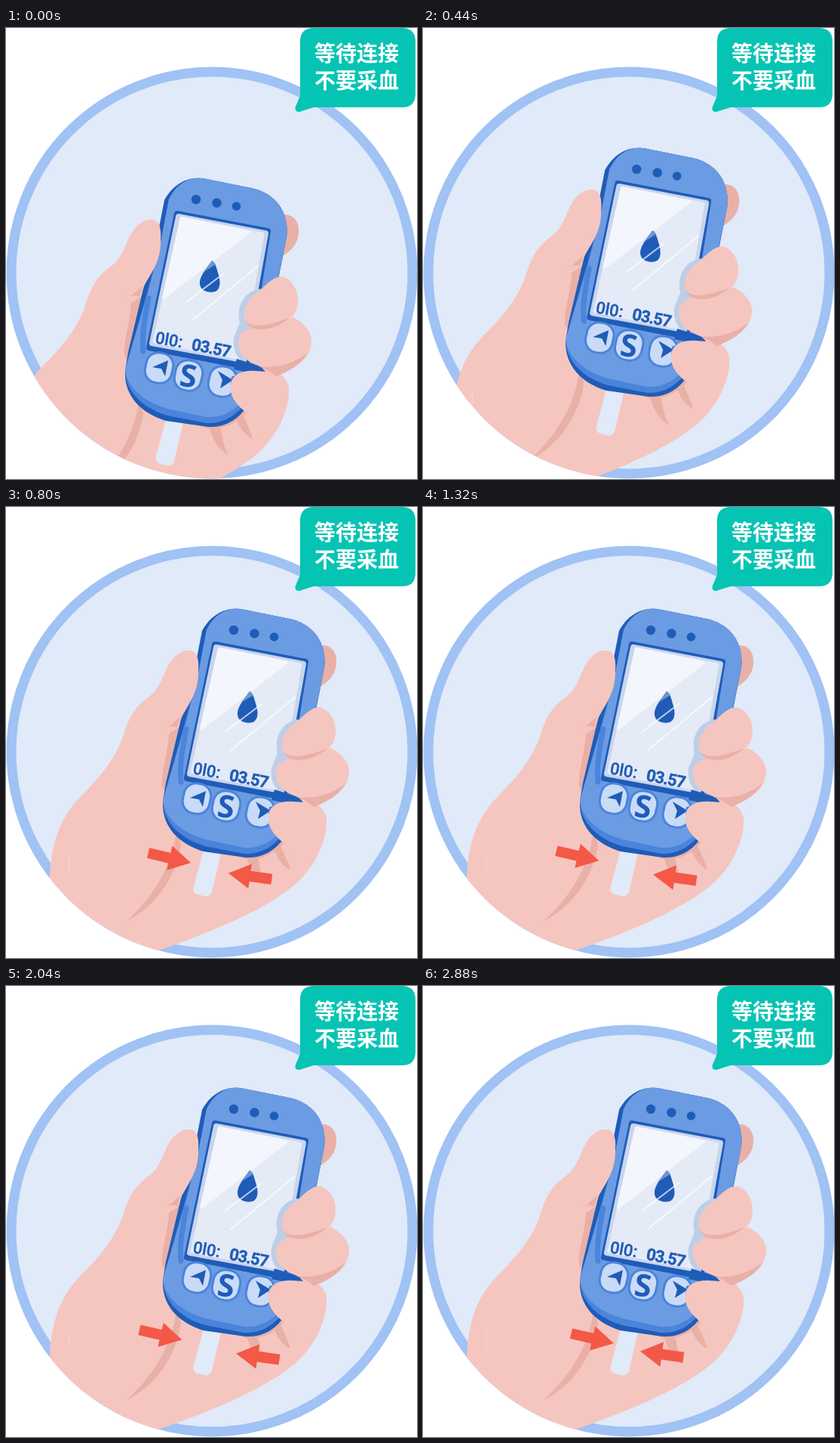
Write an HTML page that moves like this. It is 545 px wide and 597 px high and loops after 2920 ms.

```html
<!DOCTYPE html>
<html lang="zh">
<head>
<meta charset="utf-8">
<style>
  html, body { margin: 0; width: 100%; height: 100%; overflow: hidden; background: #fff; }
  svg { display: block; }
  .skin { fill: #f5c6bf; }
  .shade { fill: #e9b0a7; }
  .navy { fill: #1f5cb8; }
  .mid { fill: none; stroke: #4a84db; stroke-linecap: round; }
  .key { fill: #c9dbf7; stroke: #4a84db; stroke-width: 3; }
  .panel { stroke-linejoin: round; }
  .digits { font: 500 22px Roboto, sans-serif; stroke: #1f5cb8; stroke-width: .4; }
  .bubble { font: bold 28px "Noto Sans CJK SC", "Noto Sans CJK", sans-serif; fill: #fff; }
</style>
</head>
<body>
<svg width="545" height="597" viewBox="0 0 545 597">
  <defs>
    <clipPath id="disc"><circle cx="273" cy="324" r="272.5"/></clipPath>
    <path id="arrow" d="M0 0L-29 -16.5V-7H-58V7H-29V16.5Z" fill="#f45847"/>
    <rect id="key" class="key" x="-18" y="-20" width="36" height="40" rx="16"/>
  </defs>

  <circle cx="273" cy="324" r="266" fill="#e0eaf9" stroke="#a0c2f4" stroke-width="13"/>

  <g clip-path="url(#disc)">
    <g id="hand">
      <!-- palm -->
      <path class="shade" d="M414 184C430 179 440 193 438 208C437 221 428 232 416 238Z"/>
      <path class="skin" d="M58 660V492C60 440 74 409 99 383C128 355 146 330 155 304C164 275 172 264 190 251C202 242 207 227 214 212C222 196 234 189 245 190L300 250L400 390L425 410C425 452 404 481 383 500C350 527 300 553 202 587V660Z"/>
      <path d="M84 458V480" stroke="#f8d5cf"/>
      <path class="shade" d="M226 428C222 470 198 514 160 548C194 532 226 493 232 446Z"/>
      <path class="shade" d="M216 300C214 330 205 352 207 370L214 380L232 290Z"/>
      <path class="shade" d="M284 456L372 440C362 456 340 467 322 467Z"/>
      <path class="shade" d="M319 463C324 480 332 496 345 501C336 486 338 475 333 462ZM354 450C358 462 366 476 377 480C374 468 368 458 364 448ZM372 440C376 454 385 462 396 461C386 454 384 446 382 438Z"/>
      <path d="M263 450L286 454L273 510Q269 517 262 515L252 512Q247 509 249 502Z" fill="#e0eaf9"/>

      <!-- meter body -->
      <path class="navy" d="M260 164C272 142 292 131 316 136L376 148C408 155 426 180 422 213L384 405C374 440 352 466 318 464L262 456C226 445 206 420 208 389L212 365L231 285L250 215Z"/>
      <path fill="#4a84db" d="M266 163C276 142 294 131 316 136L376 148C408 155 426 180 422 213L383 402C374 432 350 461 316 459L264 449C228 438 208 415 208 388L236 290L254 225Z"/>
      <path fill="#6b9be2" d="M266 163C276 142 294 131 316 136L376 148C408 155 426 180 422 213L383 395C374 425 350 453 316 451L264 440C230 430 210 410 208 388L238 288L254 225Z"/>
      <path class="mid" stroke-width="7" d="M239 294C233 325 230 345 232 364"/>
      <g class="navy">
        <circle cx="302" cy="163" r="6.2"/><circle cx="329.500" cy="167.500" r="6.200"/><circle cx="355.500" cy="172" r="5.800"/>
      </g>

      <!-- screen -->
      <path class="panel" d="M277 182L397 205L368 384L240 359Z" fill="#1f5cb8" stroke="#1f5cb8" stroke-width="8"/>
      <path class="panel" d="M279 186L394 208L364 375L244 353Z" fill="#c8d5ee" stroke="#c8d5ee" stroke-width="8"/>
      <path class="panel" d="M283 188L390 209L361 373L247 351Z" fill="#e4eaf6" stroke="#e4eaf6" stroke-width="5"/>
      <path class="panel" d="M283 188L372 206L259 293Z" fill="#f3f6fd" stroke="#f3f6fd" stroke-width="4"/>
      <path class="navy" d="M323 244C318 252 306 264 307 275C308 285 320 287 327 285C336 282 334 268 331 260C329 252 327 246 323 244Z"/>
      <path fill="#6f95cf" d="M323 244C319 250 315 255 312 259L328 249C326 246 325 245 323 244Z"/>
      <path d="M290 298L340 260M297 323L384 251" stroke="#fff" stroke-width="2" opacity=".7"/>
      <g class="digits navy">
        <text transform="translate(247 353) rotate(10)">0l0:</text>
        <text transform="translate(295 362) rotate(11)" font-weight="700" letter-spacing="-1">03.57</text>
      </g>

      <!-- keys -->
      <use href="#key" transform="translate(253 386) rotate(12)"/>
      <use href="#key" transform="translate(292 396) rotate(12)"/>
      <use href="#key" transform="translate(337 404) rotate(12)"/>
      <path class="navy" d="M244 385L265 376L261 397L256 387ZM331 390L351 402L334 413L337 402Z"/>
      <text class="navy" transform="translate(290 411) rotate(7)" text-anchor="middle" font-family="Open Sans, sans-serif" font-size="41" font-weight="700">S</text>

      <!-- shadows cast on the meter -->
      <path fill="#bdcee8" d="M388 281C366 284 355 304 360 326L352 346C350 362 356 374 368 380L380 340Z"/>
      <path class="navy" d="M356 374L388 384L394 391L372 392L352 388Z"/>
      <path class="mid" stroke-width="7" d="M352 400C350 420 358 432 368 438"/>

      <!-- thumb -->
      <path class="skin" d="M190 260C202 242 207 227 214 212C222 196 234 188 246 190C254 193 256 203 255 216C256 248 240 262 230 284L205 300Z"/>
      <path class="shade" d="M208 295C218 290 224 284 231 277L227 292C220 288 214 291 208 295Z"/>

      <!-- fingers -->
      <path class="skin" d="M348 408C350 394 364 388 382 390L410 392C422 398 426 410 425 420C424 450 405 475 385 488L370 446C354 434 346 422 348 408Z"/>
      <path class="skin" d="M358 352C357 340 368 333 390 331L430 319C444 325 456 338 455 352C453 374 436 386 408 396C400 388 384 384 372 377C362 371 358 362 358 352Z"/>
      <path class="shade" d="M386 384C410 387 432 380 450 366C440 383 424 391 408 397C402 391 395 388 386 384Z"/>
      <path class="shade" d="M367 322C372 340 404 340 428 318L420 308Z"/>
      <path class="skin" d="M366 314C366 302 374 293 386 284C397 274 405 265 416 265C429 268 438 283 437 299C436 309 433 315 428 319C408 326 384 335 370 326C366 323 365 319 366 314Z"/>
    </g>
  </g>

  <g id="arrows">
    <use id="left" href="#arrow"/>
    <use id="right" href="#arrow"/>
  </g>

  <path fill="#06c4b3" d="M408 0H525Q543 0 543 18V87Q543 105 525 105H408L389 111Q382 111 384 104L390 90V18Q390 0 408 0Z"/>
  <g class="bubble">
    <text x="409" y="44">等待连接</text>
    <text x="409" y="80">不要采血</text>
  </g>
</svg>
<script>
  const LOOP = 2920, STEP = 40;
  const RISE_START = 240, RISE_END = 560;
  const PUSH = 160, PULL = 200;
  const [hand, arrows, left, right] = ['hand', 'arrows', 'left', 'right'].map(id => document.getElementById(id));

  const ease = p => (1 - Math.cos(Math.PI * p)) / 2;

  // 1 when the arrows are farthest from the strip, 0 when closest
  function spread(time) {
    const phase = time % (PUSH + PULL);
    return phase < PUSH ? 1 - ease(phase / PUSH) : ease((phase - PUSH) / PULL);
  }

  function place(node, x, y, angle) {
    node.setAttribute('transform', `translate(${x} ${y}) rotate(${angle})`);
  }

  function draw(now) {
    const t = Math.floor(now % LOOP / STEP) * STEP;
    const rest = 1 - Math.min(1, Math.max(0, (t - RISE_START) / (RISE_END - RISE_START)));
    place(hand, -50 * rest, 64 * rest, 0);

    arrows.style.display = t < RISE_END ? 'none' : '';
    const out = spread(Math.max(0, t - RISE_END));
    place(left, 253 - 23 * out, 473 - 5.5 * out, 13);
    place(right, 288 + 20 * out, 483.5 + 3.5 * out, 188);
  }

  const start = performance.now();
  function frame() {
    draw(performance.now() - start);
    requestAnimationFrame(frame);
  }
  frame();
</script>
</body>
</html>
```
